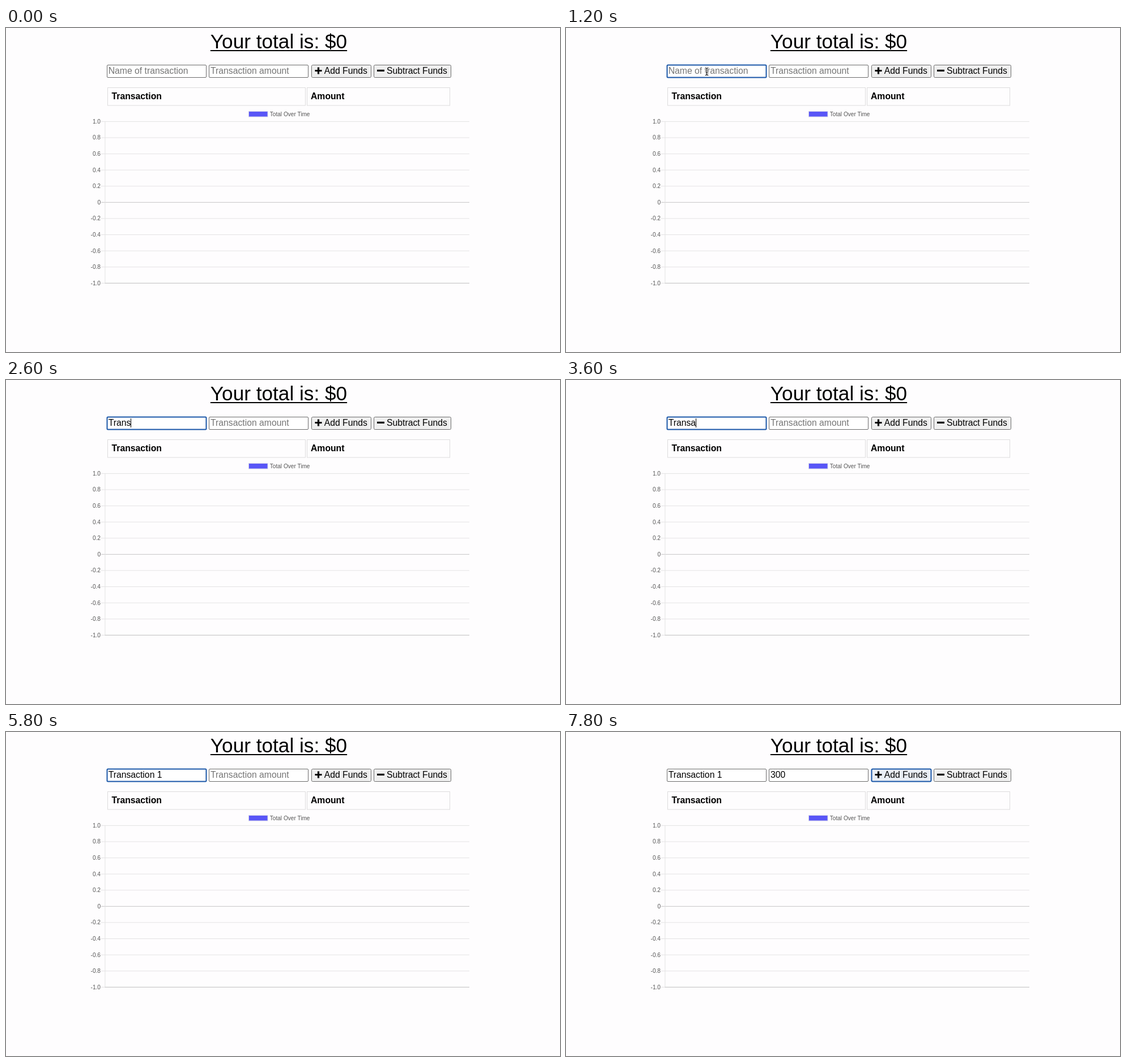
An HTML page for the animation above (8000 ms loop, 978 by 573 pixels).

```html
<!DOCTYPE html>
<html lang="en">
<head>
<meta charset="utf-8">
<title>Budget tracker</title>
<style>
  html, body { margin: 0; width: 100%; height: 100%; overflow: hidden; background: #fefdfe; }
  body { position: relative; font-family: "Liberation Sans", Arial, sans-serif; }
  h1 {
    position: absolute; left: 281.5px; top: 4px; width: 400px; margin: 0;
    font-size: 35.2px; font-weight: normal; line-height: 40px; text-align: center;
    text-decoration: underline 2px; text-underline-offset: 3px; white-space: nowrap;
  }
  svg { position: absolute; left: 0; top: 0; }
  text { font-size: 15.76px; fill: #000; }
  .bold { font-weight: bold; }
  .hint { fill: #757575; }
  .chart text { font-size: 10.1px; fill: #555; }
  .box { fill: #fff; stroke: #6b6b6b; }
  .button { fill: #efefef; }
  .box.focus { stroke: #1a57a8; stroke-width: 2; }
  .button.focus { fill: #e9eef5; }
  .cell { fill: none; stroke: #dddcdd; }
  .grid { stroke: #e4e3e4; }
  .axis { stroke: #c6c5c6; }
</style>
</head>
<body>
<h1>Your total is: $0</h1>
<svg width="978" height="573" viewBox="0 0 978 573">
  <rect id="nameBox" class="box" x="178.5" y="65.5" width="175" height="22" rx="1.5"/>
  <text id="name" x="180.7" y="81"></text>

  <rect id="amountBox" class="box" x="358.5" y="65.5" width="175" height="22" rx="1.5"/>
  <text id="amount" x="361" y="81"></text>
  <g id="spinner">
    <rect x="519" y="68" width="11" height="16" rx="2" fill="#efeeef"/>
    <path d="M521.3 73.6L524.5 70l3.2 3.6zM521.3 78.4L524.5 82l3.2-3.6z" fill="#444"/>
  </g>
  <path id="caret" d="M0 68v16" stroke="#000"/>

  <rect id="addBox" class="box button" x="539.5" y="65.5" width="105" height="22" rx="2"/>
  <path d="M545.5 75.5h12m-6-6v12" stroke="#000" stroke-width="3.2"/>
  <text x="561.7" y="81">Add Funds</text>
  <rect class="box button" x="649.5" y="65.5" width="136" height="22" rx="2"/>
  <path d="M655 75.3h13" stroke="#000" stroke-width="3.2"/>
  <text x="672" y="81">Subtract Funds</text>

  <rect class="cell" x="179.5" y="105.5" width="349" height="31.5"/>
  <rect class="cell" x="531.5" y="105.5" width="252" height="31.5"/>
  <text class="bold" x="186.5" y="126">Transaction</text>
  <text class="bold" x="538" y="126">Amount</text>

  <g class="chart">
    <rect x="428.5" y="147.5" width="33.5" height="9.5" fill="#5956f7" stroke="#cfcdea"/>
    <text x="465.8" y="155.6">Total Over Time</text>
    <g id="rows"></g>
    <path class="grid" d="M174.9 165V451"/>
    <path class="axis" d="M174.5 451.3H818"/>
  </g>

  <path id="arrow" d="M0 0V15.5L3.6 12.2L6 17.6L8.6 16.5L6.2 11.2H11.2Z" fill="#000" stroke="#fff"/>
  <g id="beam" fill="none" stroke-linecap="round">
    <path id="beamShape" d="M-2.5-6.5Q0-6.5 0-4.5Q0-6.5 2.5-6.5M0-4.5V4.5M-2.5 6.5Q0 6.5 0 4.5Q0 6.5 2.5 6.5M-1.5 2h3" stroke="#fff" stroke-width="3"/>
    <use href="#beamShape" id="beamInk"/>
  </g>
</svg>
<script>
  const LOOP = 8000, STEP = 200;
  const $ = id => document.getElementById(id);
  const show = (id, on) => $(id).setAttribute("visibility", on ? "visible" : "hidden");
  const between = (t, from, to) => t >= from && t < to;

  // The dark stroke over the white halo of the text pointer
  const ink = $("beamShape").cloneNode();
  ink.removeAttribute("id");
  ink.setAttribute("stroke", "#111");
  ink.setAttribute("stroke-width", "1.1");
  $("beamInk").replaceWith(ink);

  let rows = "";
  for (let i = 0; i <= 10; i++) {
    const y = 165.4 + i * 28.59;
    const label = i === 5 ? "0" : (1 - i / 5).toFixed(1);
    rows += `<path class="${i === 5 ? "axis" : "grid"}" d="M168 ${y}H818"/>
      <text x="167" y="${y + 3.5}" text-anchor="end">${label}</text>`;
  }
  $("rows").innerHTML = rows;

  function typedName(t) {
    if (t < 1800) return "";
    if (t >= 5200) return "Transaction 1";
    let count = Math.min(5, (t - 1600) / STEP);
    if (t >= 3600) count = 6;
    if (t >= 4200) count = 7 + (t - 4200) / STEP;
    return "Transaction".slice(0, count);
  }

  const typedAmount = t => t < 6600 ? "" : "300".slice(0, (t - 6400) / STEP);

  function fill(id, value, hint) {
    $(id).textContent = value || hint;
    $(id).classList.toggle("hint", !value);
  }

  function drawPointer(t) {
    const p = Math.min(1, Math.max(0, (t - 200) / 600));
    const ease = p * p * (3 - 2 * p);
    const x = 613 + (248.5 - 613) * ease, y = 338 + (77 - 338) * ease;
    for (const id of ["arrow", "beam"]) $(id).setAttribute("transform", `translate(${x} ${y})`);
    show("arrow", between(t, 200, 800));
    show("beam", between(t, 800, 1800));
  }

  function draw(t) {
    const name = typedName(t), amount = typedAmount(t);
    fill("name", name, "Name of transaction");
    fill("amount", amount, "Transaction amount");

    const inName = between(t, 1000, 6200), inAmount = between(t, 6200, 7800);
    $("nameBox").classList.toggle("focus", inName);
    $("amountBox").classList.toggle("focus", inAmount);
    $("addBox").classList.toggle("focus", t >= 7800);
    show("spinner", inAmount);

    const blink = between(t, 1200, 1800) || [3000, 5800, 7600].includes(t);
    const field = $(inName ? "name" : "amount");
    const width = (inName ? name : amount) ? field.getComputedTextLength() : 0;
    const caretX = Math.floor(+field.getAttribute("x") + width) + 0.5;
    $("caret").setAttribute("transform", `translate(${caretX} 0)`);
    show("caret", (inName || inAmount) && !blink);

    drawPointer(t);
  }

  const start = performance.now();
  let last = -1;
  function tick() {
    const t = Math.floor(((performance.now() - start) % LOOP) / STEP) * STEP;
    if (t !== last) draw(last = t);
    requestAnimationFrame(tick);
  }
  tick();
</script>
</body>
</html>
```
